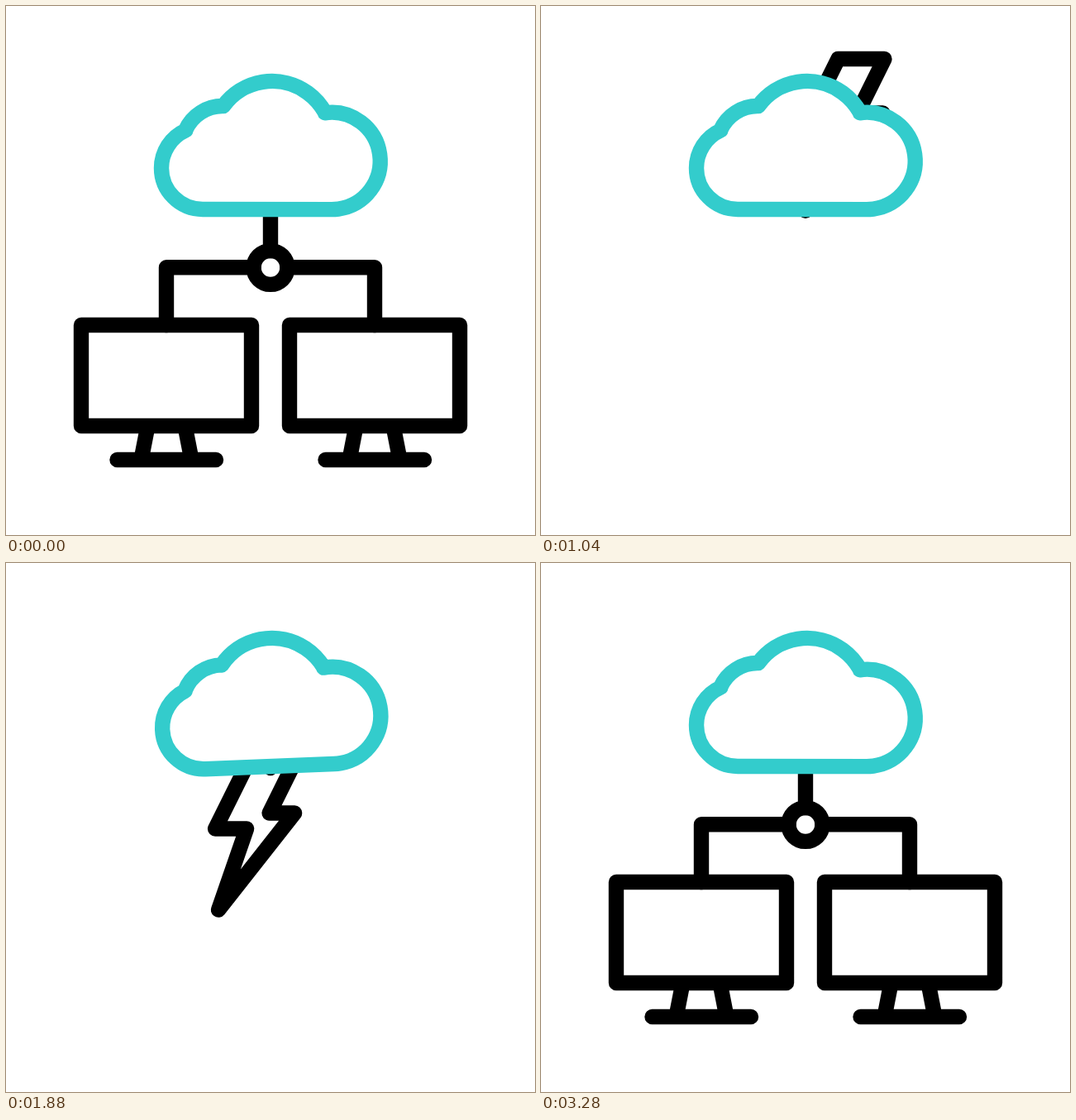
An HTML page with a canvas for the animation above (3720 ms loop, 640x640 px).

```html
<!DOCTYPE html>
<html lang="en">
<head>
<meta charset="utf-8">
<title>Cloud network</title>
<style>
html, body { margin: 0; width: 100%; height: 100%; overflow: hidden; background: #fff; }
canvas { display: block; width: 640px; height: 640px; }
</style>
</head>
<body>
<canvas id="stage" width="640" height="640"></canvas>
<script>
const ctx = document.getElementById('stage').getContext('2d');
const LOOP = 3720, STEP = 40;
const BLACK = '#000', TEAL = '#33cccc';
const DEG = Math.PI / 180;

// Eased progress from 0 to 1 between two times
function ease(t, from, to) {
  const u = Math.min(1, Math.max(0, (t - from) / (to - from)));
  return u * u * (3 - 2 * u);
}

// 1 at rest, 0 while away
function present(t, outFrom, outTo, inFrom, inTo) {
  return 1 - ease(t, outFrom, outTo) + ease(t, inFrom, inTo);
}

// Draws the first part of a polyline
function trim(points, amount) {
  if (amount <= 0.001) return;
  const lengths = points.slice(1).map((p, i) => Math.hypot(p[0] - points[i][0], p[1] - points[i][1]));
  let left = amount * lengths.reduce((a, b) => a + b, 0);
  ctx.beginPath();
  ctx.moveTo(...points[0]);
  for (let i = 0; i < lengths.length && left > 0; i++) {
    const k = Math.min(1, left / lengths[i]);
    const [ax, ay] = points[i], [bx, by] = points[i + 1];
    ctx.lineTo(ax + (bx - ax) * k, ay + (by - ay) * k);
    left -= lengths[i];
  }
  ctx.stroke();
}

function arcPath(arcs) {
  const path = new Path2D();
  for (const [x, y, r, a, b] of arcs) path.arc(x, y, r, a * DEG, b * DEG);
  path.closePath();
  return path;
}

const cloud = arcPath([
  [238, 196, 50, 90, 245.5],
  [262, 170, 49, 204, 271],
  [322, 164, 73, 216, 331.3],
  [394, 187.4, 58.7, 262, 450]
]);
const bolt = new Path2D('M286 261.5H342L309.5 327H340L248 444L282 346H244Z');
const monitor = new Path2D(
  'M91 386H297V508H91ZM171.5 508L163.5 549M216.5 508L224.5 549M134.5 549H254');

function drawBolt(t) {
  if (t < 1000 || t >= 2142) return;
  const drop = ease(t, 1000, 1384) - ease(t, 1742, 2142);
  const y = -205 + 249 * drop;
  ctx.save();
  if (t > 1700) {
    ctx.beginPath();
    ctx.rect(0, 170, 640, 470);
    ctx.clip();
  }
  ctx.translate(-0.372 * y, y);
  ctx.stroke(bolt);
  ctx.restore();
}

function drawLinks(t) {
  trim([[320, 246], [320, 296]], present(t, 880, 1060, 1840, 2170));
  trim([[299.6, 316.3], [194, 316.3], [194, 386]], present(t, 240, 680, 2320, 2800));
  trim([[340.4, 316.3], [446, 316.3], [446, 386]], present(t, 200, 640, 2284, 2764));
  const sweep = present(t, 532, 932, 2156, 2556);
  if (sweep > 0.001) {
    ctx.beginPath();
    ctx.arc(320, 316.5, 20.4, 0, -sweep * 2 * Math.PI, true);
    ctx.stroke();
  }
}

function drawMonitor(x) {
  ctx.save();
  ctx.translate(x, 0);
  ctx.stroke(monitor);
  ctx.restore();
}

function drawCloud(t) {
  const swing = t > 1110 && t < 2190 ? -5.5 * Math.sin((t - 1110) / 720 * 2 * Math.PI) : 0;
  ctx.save();
  ctx.translate(320, 170);
  ctx.rotate(swing * DEG);
  ctx.translate(-320, -170);
  ctx.fillStyle = '#fff';
  ctx.fill(cloud);
  ctx.strokeStyle = TEAL;
  ctx.stroke(cloud);
  ctx.restore();
}

function draw(t) {
  ctx.fillStyle = '#fff';
  ctx.fillRect(0, 0, 640, 640);
  ctx.strokeStyle = BLACK;
  ctx.lineWidth = 18.4;
  ctx.lineCap = ctx.lineJoin = 'round';
  drawBolt(t);
  drawLinks(t);
  drawMonitor(-329 * (1 - present(t, 40, 840, 2555, 3215)));
  drawMonitor(252 + 329 * (1 - present(t, 120, 920, 2618, 3280)));
  drawCloud(t);
}

function tick() {
  const t = performance.now() % LOOP;
  draw(Math.floor(t / STEP) * STEP);
  requestAnimationFrame(tick);
}
tick();
</script>
</body>
</html>
```
